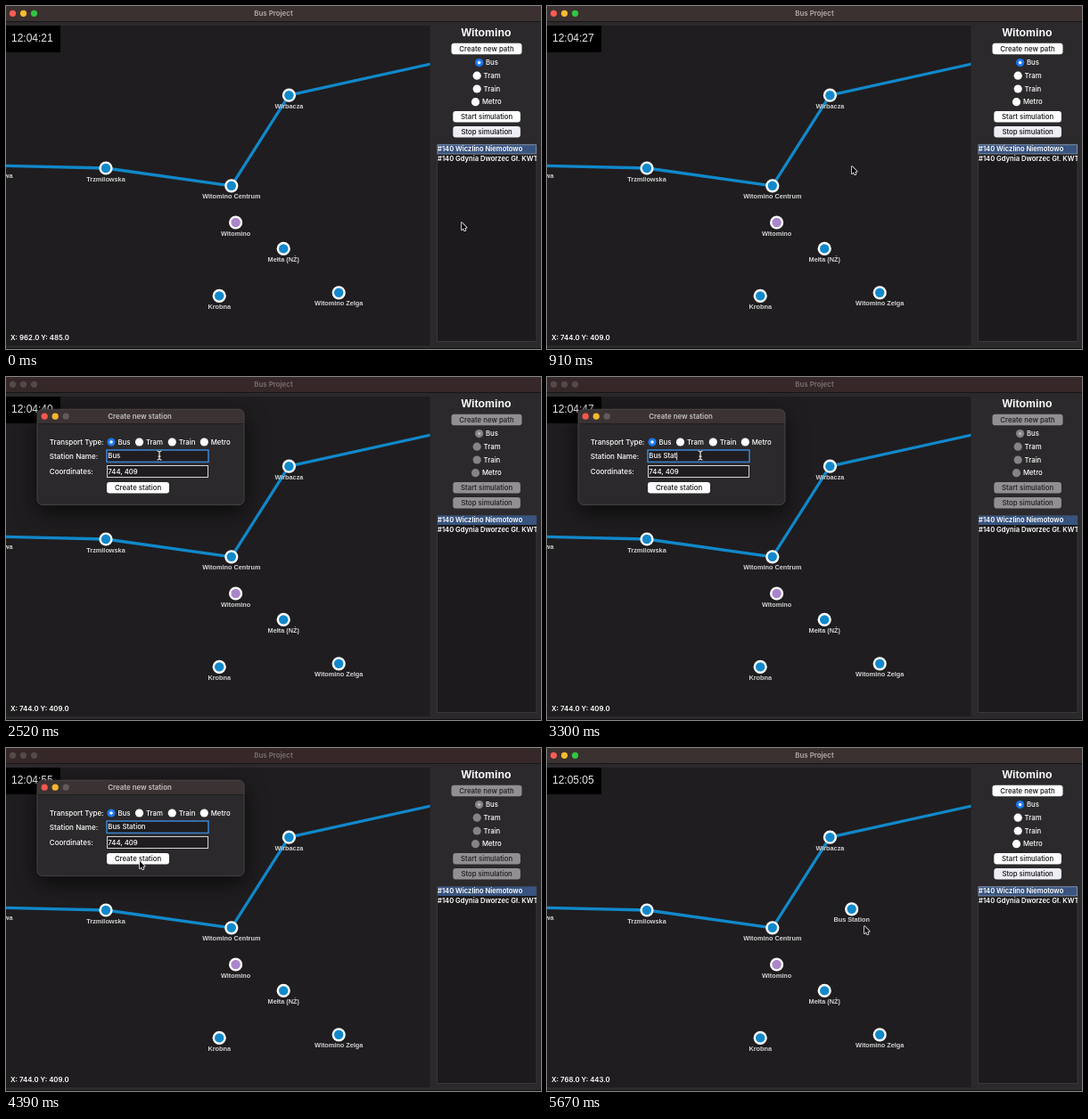
These frames come from a looping animation (600 px wide and 385 px high, 5.7 s). An HTML page with a canvas:

```html
<!DOCTYPE html>
<html lang="pl">
<head>
<meta charset="utf-8">
<title>Bus Project</title>
<style>
html, body { margin: 0; width: 600px; height: 385px; overflow: hidden; background: #2a282a; }
canvas { display: block; }
</style>
</head>
<body>
<canvas id="stage" width="600" height="385"></canvas>
<script>
const ctx = document.getElementById('stage').getContext('2d');
const LOOP = 5700, OPEN = 1150, FOCUS = 1950, CLOSE = 4850;
const UI = 'Inter, sans-serif', MAP = '"Liberation Sans", Arial, sans-serif';
const BLUE = '#1188ca', DARK = '#1f1d1f', PANEL = '#2b292b';

// [time, value...] keys
const clockKeys = [[0, 21], [910, 27.5], [1550, 32.8], [2520, 40.4], [3300, 47.1], [4390, 55.3], [5700, 65.6]];
const pointerKeys = [[0, 511, 243], [120, 511, 243], [820, 342, 180], [1190, 342, 180], [1550, 193, 93.5],
  [1880, 172, 88], [3850, 172, 88], [4300, 150, 127], [4900, 150, 127], [5620, 356, 200], [5700, 356, 200]];
const typedAt = [2150, 2300, 2450, 2600, 2750, 2900, 3060, 3220, 3400, 3550, 3700];

const stations = [
  ['Trzmilowska', 112, 182], ['Witomino Centrum', 252.8, 201.8], ['Wirbacza', 317.4, 100.2],
  ['Witomino', 257.6, 243, '#a985cb'], ['Mełta (NŻ)', 311.2, 272.4],
  ['Krobna', 239.2, 325.4], ['Witomino Zelga', 373.2, 321.8]
];

const smooth = p => p * p * (3 - 2 * p);

function sample(keys, t, ease = p => p) {
  const i = Math.max(1, keys.findIndex(k => k[0] >= t));
  const a = keys[i - 1], b = keys[i];
  const p = ease((t - a[0]) / (b[0] - a[0]));
  return a.slice(1).map((v, n) => v + (b[n + 1] - v) * p);
}

function rect(x, y, w, h, color) {
  ctx.fillStyle = color;
  ctx.fillRect(x, y, w, h);
}

function round(x, y, w, h, r, color) {
  ctx.fillStyle = color;
  ctx.beginPath();
  ctx.roundRect(x, y, w, h, r);
  ctx.fill();
}

function frame(x, y, w, h, color, width = 1) {
  ctx.strokeStyle = color;
  ctx.lineWidth = width;
  ctx.strokeRect(x, y, w, h);
}

function disc(x, y, r, color) {
  ctx.fillStyle = color;
  ctx.beginPath();
  ctx.arc(x, y, r, 0, 7);
  ctx.fill();
}

function text(s, x, y, size = 7.8, color = '#fff', align = 'left', weight = 500, family = UI) {
  ctx.font = `${weight} ${size}px ${family}`;
  ctx.textAlign = align;
  ctx.textBaseline = 'middle';
  ctx.fillStyle = color;
  ctx.fillText(s, x, y);
}

function button(label, x, y, w, active, color = '#fff') {
  round(x, y, w, 12.5, 3, active ? color : '#918f91');
  text(label, x + w / 2, y + 6.6, 7.8, active ? '#111' : '#1d1b1d', 'center');
}

function radio(label, x, y, on, active = true) {
  disc(x, y, 4.6, !active ? '#858385' : on ? '#1a78f0' : '#fff');
  if (on) disc(x, y, 1.8, active ? '#fff' : '#b5b3b5');
  text(label, x + 7.4, y + .4);
}

function lights(x, y, colors) {
  colors.forEach((c, i) => disc(x + i * 12, y, 3.6, c));
}

function station([name, x, y, color = BLUE]) {
  disc(x, y, 7.6, '#fff');
  disc(x, y, 5.2, color);
  text(name, x, y + 12.6, 7.3, '#d2d2d2', 'center', 'bold', MAP);
}

function drawMap(t, x, y) {
  ctx.save();
  ctx.beginPath();
  ctx.rect(0, 22, 475.5, 359);
  ctx.clip();
  rect(0, 22, 476, 359, DARK);
  ctx.strokeStyle = BLUE;
  ctx.lineWidth = 3.3;
  ctx.lineJoin = 'round';
  ctx.beginPath();
  [[-8, 179.2], [112, 182], [252.8, 201.8], [317.4, 100.2], [480, 64.3]].forEach(p => ctx.lineTo(...p));
  ctx.stroke();
  stations.forEach(station);
  if (t >= CLOSE) station(['Bus Station', 341.7, 180.8]);
  text('owa', 7.5, 190.8, 7.3, '#d2d2d2', 'right', 'bold', MAP);

  rect(0, 22, 61, 30, '#000');
  const s = Math.floor(sample(clockKeys, t)[0]);
  const pad = n => String(n).padStart(2, '0');
  text(`12:${pad(4 + Math.floor(s / 60))}:${pad(s % 60)}`, 6, 36.5, 12, '#e8e8e8', 'left', 400, MAP);

  let mx = 744, my = 409;
  if (t < OPEN || t >= CLOSE + 50) {
    mx = x > 470 ? 962 : Math.round(744 + (x - 342) / .584);
    my = x > 470 ? 485 : Math.round(409 + (y - 180) / .584);
  }
  text(`X: ${mx}.0 Y: ${my}.0`, 5, 372.4, 7.8, '#fff', 'left', 600);
  ctx.restore();
}

function drawPanel(active) {
  text('Witomino', 538.5, 31, 12.3, '#fff', 'center', 'bold', MAP);
  button('Create new path', 499.5, 41.7, 79, active);
  radio('Bus', 530.6, 63.6, true, active);
  radio('Tram', 528.2, 78.2, false, active);
  radio('Train', 528.2, 93, false, active);
  radio('Metro', 526.5, 107.7, false, active);
  button('Start simulation', 501.3, 118, 75.6, active);
  button('Stop simulation', 501.3, 135, 75.6, active, '#ededf4');

  rect(483, 155, 112, 222, '#1c1a1c');
  frame(483.5, 155.5, 111.5, 221, '#383638');
  ctx.save();
  ctx.beginPath();
  ctx.rect(483, 155, 112, 222);
  ctx.clip();
  rect(484, 155.5, 111, 10.5, '#38547f');
  if (active) frame(484, 155.8, 110.5, 10.2, '#8d9bb2', .8);
  text('#140 Wiczlino Niemotowo', 484, 161, 7.6, '#fff', 'left', 600);
  text('#140 Gdynia Dworzec Gł. KWT', 484, 171.5, 7.6, '#fff', 'left', 600);
  ctx.restore();
}

function drawDialog(t) {
  ctx.save();
  ctx.shadowColor = 'rgba(0,0,0,.65)';
  ctx.shadowBlur = 24;
  ctx.shadowOffsetY = 8;
  round(35, 36.2, 232, 107.4, 6, PANEL);
  ctx.restore();
  round(35, 36.2, 232, 16, [6, 6, 0, 0], '#3b3333');
  rect(35, 52, 232, .8, '#1b191b');
  ctx.strokeStyle = '#4f4c4e';
  ctx.lineWidth = .8;
  ctx.beginPath();
  ctx.roundRect(35, 36.2, 232, 107.4, 6);
  ctx.stroke();
  lights(43.2, 44.2, ['#f4574e', '#f6b52e', '#605b5b']);
  text('Create new station', 150, 44.4, 7.9, '#c5c0c0', 'center', 600);

  text('Transport Type:', 48.8, 73.4, 8);
  text('Station Name:', 48.8, 89.8, 8.1);
  text('Coordinates:', 48.8, 106.8, 8);
  [['Bus', 118], ['Tram', 149.5], ['Train', 186.3], ['Metro', 222.3]]
    .forEach(([label, x], i) => radio(label, x, 73, i === 0));

  rect(113, 82, 114, 13.5, DARK);
  if (t >= FOCUS) frame(113, 82, 114, 13.4, '#3b80cc', 1.6);
  else frame(113.3, 82, 113.4, 13.3, '#bdbdbd');
  rect(113, 99, 114, 13.5, DARK);
  frame(113.5, 99.5, 113, 13, '#d5d5d5');

  const typed = 'Bus Station'.slice(0, typedAt.filter(k => k <= t).length);
  text(typed, 114.3, 88.8, 7.8);
  if (t >= FOCUS && t % 140 >= 70) {
    rect(114.4 + ctx.measureText(typed).width, 84.5, .8, 9, '#fff');
  }
  text('744, 409', 114.3, 106.2);
  button('Create station', 113, 118, 70, true);
}

function drawPointer(x, y, beam) {
  ctx.save();
  ctx.translate(x, y);
  ctx.lineJoin = 'round';
  ctx.beginPath();
  if (beam) {
    ctx.moveTo(-2.4, -5.2); ctx.lineTo(0, -4); ctx.lineTo(2.4, -5.2);
    ctx.moveTo(0, -4); ctx.lineTo(0, 4);
    ctx.moveTo(-2.4, 5.2); ctx.lineTo(0, 4); ctx.lineTo(2.4, 5.2);
    ctx.moveTo(-1.5, 1.2); ctx.lineTo(1.5, 1.2);
    ctx.strokeStyle = '#222';
    ctx.lineWidth = 2.2;
    ctx.stroke();
    ctx.strokeStyle = '#e8e8e8';
    ctx.lineWidth = 1.2;
    ctx.stroke();
  } else {
    [[0, 0], [0, 8.2], [1.9, 6.6], [3.1, 9.3], [4.5, 8.7], [3.3, 6], [5.7, 5.8]]
      .forEach(p => ctx.lineTo(...p));
    ctx.closePath();
    ctx.strokeStyle = '#fff';
    ctx.lineWidth = 1.5;
    ctx.stroke();
    ctx.fillStyle = '#000';
    ctx.fill();
  }
  ctx.restore();
}

function draw(t) {
  const open = t >= OPEN && t < CLOSE;
  const [x, y] = sample(pointerKeys, t, smooth);
  rect(0, 0, 600, 385, PANEL);
  rect(0, 0, 600, 17, open ? '#362828' : '#3b3130');
  rect(0, 17, 600, 1, '#171517');
  lights(7.5, 8.3, open ? ['#554a4a', '#554a4a', '#554a4a'] : ['#fb5c54', '#f8bb30', '#2fc642']);
  text('Bus Project', 300, 8.6, 7.9, open ? '#7d7070' : '#b5acab', 'center', 600);
  drawMap(t, x, y);
  drawPanel(!open);
  rect(0, 384, 600, 1, '#111');
  if (open) drawDialog(t);
  const overField = x > 113 && x < 227 && y > 82 && y < 113 && (y < 96 || y > 99);
  drawPointer(x, y, open && overField);
}

const start = performance.now();
function tick() {
  draw((performance.now() - start) % LOOP);
  requestAnimationFrame(tick);
}
tick();
</script>
</body>
</html>
```
